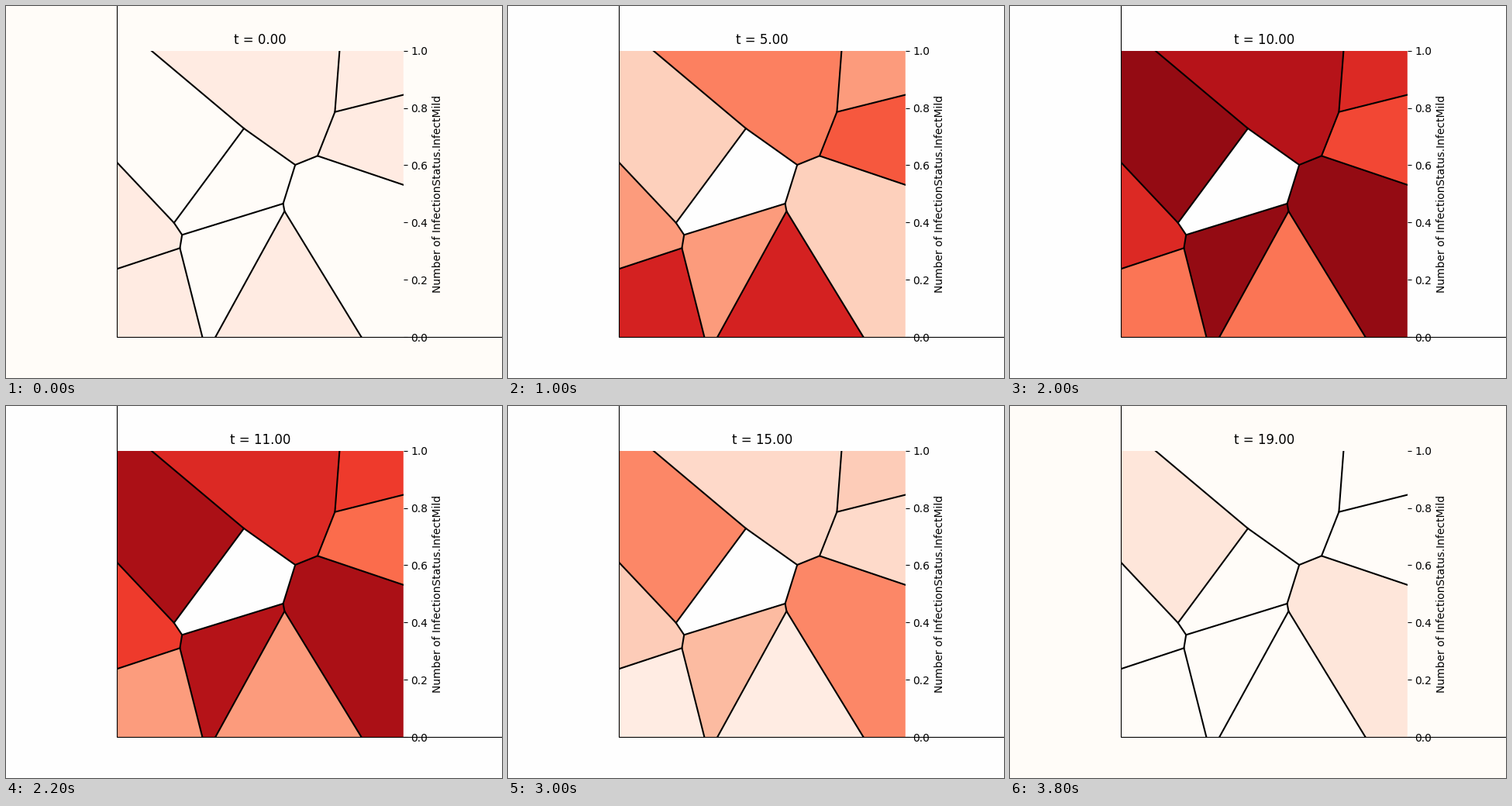
A matplotlib script that plays this animation: 640 px wide and 480 px high, repeating every 4 s.

```python
import numpy as np
import matplotlib.pyplot as plt
from matplotlib.animation import FuncAnimation

W, H = 640, 480
LEFT, BOTTOM, SIDE = 143.2, 427.2, 369.6
WHITE, CREAM = "#fefefe", "#fffcf8"
FRAMES, INTERVAL = 20, 200

# Corners of the regions in stage pixels, y down
POINTS = {
    "tl": (143.2, 57.6), "tr": (512.8, 57.6), "bl": (143.2, 427.2), "br": (512.8, 427.2),
    "t1": (187.5, 57.6), "t2": (430.4, 57.6), "r1": (512.8, 114.6), "r2": (512.8, 230.8),
    "b1": (253.4, 427.2), "b2": (270.2, 427.2), "b3": (458.6, 427.2),
    "l1": (143.2, 201.8), "l2": (143.2, 339.2),
    "q": (307, 158), "r": (373.2, 205), "s": (402, 193.4), "t": (424.4, 136.7),
    "x": (357.6, 255), "y": (359.4, 264.8), "c": (224.4, 312.4),
    "d": (227.2, 295.3), "e": (216.8, 279.8),
}

# Infection level of each region at the key times
KEYS = np.array([0, 3, 5, 7, 10, 13, 15, 19.0])
REGIONS = [
    ("t1 q r s t t2", [.06, .20, .43, 1.0, .82, .38, .15, 0]),
    ("t2 t r1 tr", [.06, .17, .35, .66, .69, .42, .195, 0]),
    ("t s r2 r1", [.06, .27, .55, .70, .59, .275, .145, 0]),
    ("tl t1 q e l1", [0, .02, .18, .70, .91, .63, .41, .09]),
    ("l1 e d c l2", [.06, .17, .35, .66, .69, .42, .195, 0]),
    ("l2 c b1 bl", [.06, .40, .715, .86, .465, .15, .055, 0]),
    ("c d x y b2 b1", [0, .12, .35, .66, .91, .50, .25, 0]),
    ("y b3 b2", [.06, .40, .715, .70, .465, .125, .055, 0]),
    ("r s r2 br b3 y x", [0, .02, .18, .70, .91, .63, .41, .09]),
]
BORDERS = ["t1 q r s t t2", "t r1", "s r2", "r x y b3", "y b2",
           "l1 e d c b1", "c l2", "q e", "d x"]


def path(names):
    """Turn corner names into unit-square coordinates."""
    pts = np.array([POINTS[n] for n in names.split()])
    return np.column_stack([pts[:, 0] - LEFT, BOTTOM - pts[:, 1]]) / SIDE


def level(values, t):
    """Smooth curve through the key levels."""
    v = np.array(values)
    slope = np.gradient(v, KEYS)
    slope[[0, -1]] = 0
    i = min(np.searchsorted(KEYS, t, side="right") - 1, len(KEYS) - 2)
    h = KEYS[i + 1] - KEYS[i]
    s = (t - KEYS[i]) / h
    y = (v[i] + (v[i + 1] - v[i]) * s * s * (3 - 2 * s)
         + h * s * (1 - s) * (slope[i] * (1 - s) - slope[i + 1] * s))
    return float(np.clip(y, 0, 1))


fig = plt.figure(figsize=(W / 100, H / 100), dpi=100)
ax = fig.add_axes([LEFT / W, 1 - BOTTOM / H, SIDE / W, SIDE / H])
ax.set(xlim=(0, 1), ylim=(0, 1), xticks=[])
ax.patch.set_visible(False)
for spine in ax.spines.values():
    spine.set_visible(False)
ax.yaxis.tick_right()
ax.yaxis.set_label_position("right")
ax.set_ylabel("Number of InfectionStatus.InfectMild")
title = ax.set_title("t = 0.00")

cells = [ax.fill(*path(names).T, lw=0)[0] for names, _ in REGIONS]
for names in BORDERS:
    ax.plot(*path(names).T, color="black", lw=1.5, zorder=2)
ax.plot([0, 0, (W - LEFT) / SIDE], [BOTTOM / SIDE, 0, 0], color="black",
        lw=0.8, clip_on=False, zorder=3, solid_joinstyle="miter")


def draw(t):
    levels = [level(values, t) for _, values in REGIONS]
    back = CREAM if min(levels) < 0.03 else WHITE
    fig.set_facecolor(back)
    for cell, v in zip(cells, levels):
        cell.set_facecolor(back if v < 0.03 else plt.cm.Reds(v))
    title.set_text(f"t = {t:.2f}")
    return cells + [title]


anim = FuncAnimation(fig, draw, frames=FRAMES, interval=INTERVAL,
                     repeat=True, repeat_delay=0, blit=False)
plt.show()
```
